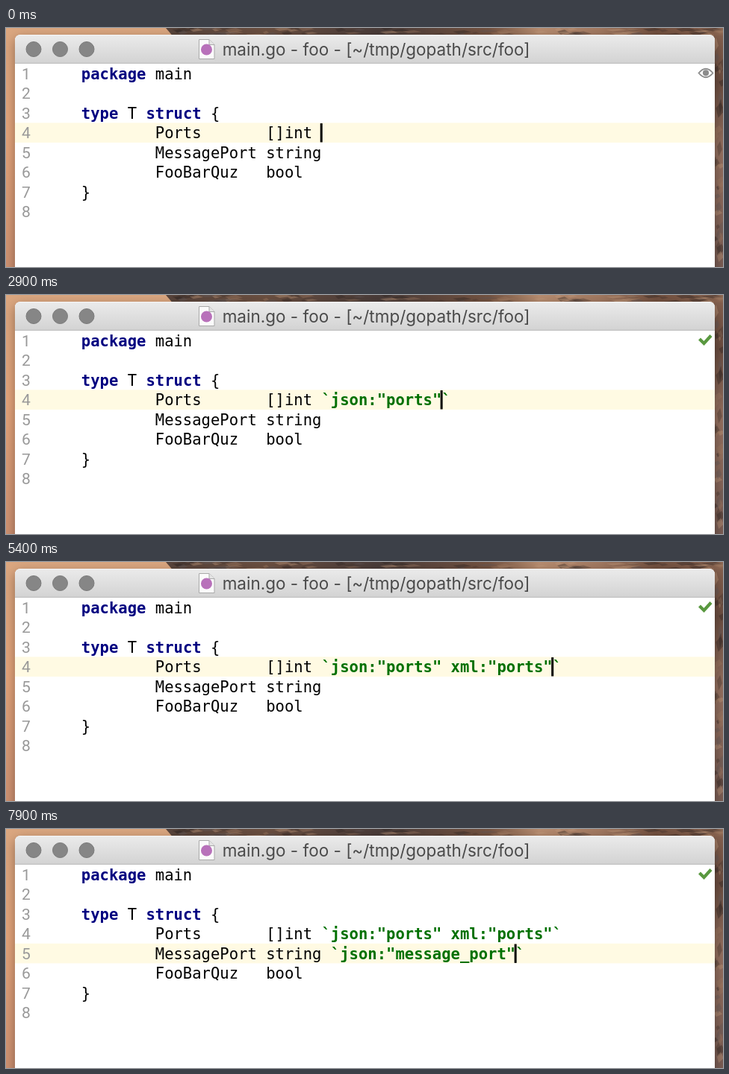
An HTML page for the animation above (8000 ms loop, 960 px wide and 321 px high).

```html
<!DOCTYPE html>
<html lang="en">
<head>
<meta charset="utf-8">
<title>Struct tag completion</title>
<style>
  html, body { margin: 0; width: 100%; height: 100%; overflow: hidden; background: #dba17b; }
  svg { display: block; width: 100vw; height: 100vh; }
  text { white-space: pre; }
  .code { font: 20.56px "DejaVu Sans Mono", monospace; fill: #000; }
  .keyword { font-weight: bold; fill: #000080; }
  .string { font-weight: bold; fill: #007000; }
  .number { font: 21px Roboto, sans-serif; fill: #999; }
  .match { fill: #d24fd0; }
  .rest { fill: #666; }
  .title { font: 22.5px Inter, sans-serif; fill: #4a4a4a; }
  .hint { font: 500 20.4px "Open Sans", sans-serif; fill: #111; }
  .symbol { font: 20px "DejaVu Sans", sans-serif; }
  .window { filter: drop-shadow(0 5px 8px rgba(0, 0, 0, .36)); }
  #popup { filter: drop-shadow(0 7px 8px rgba(0, 0, 0, .42)); }
</style>
</head>
<body>
<svg viewBox="0 0 960 321" preserveAspectRatio="none">
  <defs>
    <linearGradient id="sand" x2="0" y2="1">
      <stop offset="0" stop-color="#dba780"/>
      <stop offset=".45" stop-color="#e5a57b"/>
      <stop offset="1" stop-color="#cf9272"/>
    </linearGradient>
    <linearGradient id="ridge">
      <stop offset="0" stop-color="#58443b"/>
      <stop offset=".18" stop-color="#6c5041"/>
      <stop offset=".38" stop-color="#4a3c39"/>
      <stop offset=".58" stop-color="#745341"/>
      <stop offset=".67" stop-color="#b88d70"/>
      <stop offset=".78" stop-color="#a27961"/>
      <stop offset=".88" stop-color="#72503f"/>
      <stop offset="1" stop-color="#8a6551"/>
    </linearGradient>
    <linearGradient id="slope" x2="0" y2="1">
      <stop offset="0" stop-color="#84604e"/>
      <stop offset=".2" stop-color="#6b4d40"/>
      <stop offset=".5" stop-color="#94705f"/>
      <stop offset="1" stop-color="#7a5d54"/>
    </linearGradient>
    <linearGradient id="bar" x2="0" y2="1">
      <stop offset="0" stop-color="#ebebeb"/>
      <stop offset="1" stop-color="#d3d3d3"/>
    </linearGradient>
  </defs>

  <rect width="960" height="321" fill="url(#sand)"/>
  <path d="M214 0H960V14H226Z" fill="url(#ridge)"/>
  <rect x="944" y="10" width="16" height="311" fill="url(#slope)"/>
  <g id="rocks"></g>

  <path class="window" d="M12 340V17q0-8 8-8H941q8 0 8 8V340Z" fill="#fff"/>
  <path d="M12 47V17q0-8 8-8H941q8 0 8 8V47Z" fill="url(#bar)"/>
  <path d="M18 9.5H943" stroke="#f5f5f5"/>
  <path d="M12 47.3H949" stroke="#b4b4b4"/>
  <g fill="#868686" stroke="#7a7a7a">
    <circle cx="37" cy="28.5" r="10"/>
    <circle cx="72.5" cy="28.5" r="10"/>
    <circle cx="108" cy="28.5" r="10"/>
  </g>
  <path d="M258.5 15.5H272L279 22.5V41.5H258.5Z" fill="#fbfbfb" stroke="#a9a9a9"/>
  <path d="M272 15.5V22.5H279" fill="#e4e4e4" stroke="#a9a9a9"/>
  <circle cx="268.5" cy="29" r="7.5" fill="#b871ba"/>
  <text class="title" x="495.6" y="37" text-anchor="middle">main.go - foo - [~/tmp/gopath/src/foo]</text>

  <rect id="highlight" x="12" width="937" height="26.6" fill="#fffae3"/>
  <g id="lines"></g>
  <rect id="caret" width="3" height="25.4"/>

  <g id="eye" fill="none" stroke="#8c8c8c" stroke-width="1.8">
    <path d="M927.5 60.5Q937 49 946.5 60.5Q937 72 927.5 60.5Z"/>
    <circle cx="937" cy="60.3" r="3.2" fill="#8c8c8c"/>
  </g>
  <path id="pause" d="M932 55h3.4v12.5H932ZM938.7 55h3.4v12.5h-3.4Z" fill="#a0a0a0"/>
  <path id="check" d="M928.5 59L934.5 65L944 54.5" fill="none" stroke="#59983f" stroke-width="4.2"/>

  <g id="popup">
    <rect width="720" height="57" fill="#ededed"/>
    <rect width="720" height="29.5" fill="#9fb4c8"/>
    <text class="code" x="17.4" y="22.8"><tspan id="typed" class="match"></tspan><tspan id="untyped" class="rest"></tspan></text>
    <text id="chooseHint" class="hint" x="2.5" y="49.5">Press <tspan class="symbol">^</tspan>. to choose the selected (or first) suggestion and insert a dot afterwards</text>
    <g id="moveHint" class="hint">
      <text class="symbol" x="2" y="49.5">^↓</text>
      <text x="35.5" y="49.5">and</text>
      <text class="symbol" x="76" y="49.5">^↑</text>
      <text x="109.5" y="49.5">will move caret down and up in the editor</text>
    </g>
  </g>
</svg>
<script>
const DURATION = 8000, LEFT = 100.8, TOP = 48.5, CHAR = 12.378, LINE = 26.45;
const $ = id => document.getElementById(id);
const columnX = column => LEFT + column * CHAR;
const lineY = line => TOP + (line - 1) * LINE;
const span = (kind, text) => `<tspan class="${kind}">${text}</tspan>`;
const show = (id, on) => $(id).setAttribute('display', on ? 'inline' : 'none');
const place = (id, x, y) => { $(id).setAttribute('x', x); $(id).setAttribute('y', y); };

const indent = ' '.repeat(8);
const portsField = indent + 'Ports       []int ';
const messageField = indent + 'MessagePort string';
const jsonTag = 'json:"ports"';
const bothTags = jsonTag + ' xml:"ports"';

// Each step: time, line, plain typed text, tag contents, completion word and its typed length.
const steps = [
  { at: 0, line: 4 },
  ...typing([900, 1000, 1100, 1200], 4, 'json', n => ({ plain: 'json'.slice(0, n) })),
  { at: 1900, line: 4, tag: jsonTag },
  { at: 3300, line: 4, tag: jsonTag + ' ' },
  ...typing([3500, 3700, 3800], 4, 'xml', n => ({ tag: jsonTag + ' ' + 'xml'.slice(0, n) })),
  { at: 4400, line: 4, tag: bothTags },
  { at: 5800, line: 5 },
  { at: 6400, line: 5, plain: ' ' },
  ...typing([6700, 6900, 7000, 7200], 5, 'json', n => ({ plain: ' ' + 'json'.slice(0, n) })),
  { at: 7600, line: 5, plain: ' ', tag: 'json:"message_port"' },
];

function typing(times, line, word, content) {
  return times.map((at, i) => ({ at, line, word, typed: i + 1, ...content(i + 1) }));
}

const quoted = tag => tag ? span('string', '`' + tag + '`') : '';

function buildLines() {
  const contents = [
    span('keyword', 'package') + ' main', '',
    span('keyword', 'type') + ' T ' + span('keyword', 'struct') + ' {',
    '', '', indent + 'FooBarQuz   bool', '}', '',
  ];
  $('lines').innerHTML = contents.map((content, i) => {
    const y = lineY(i + 1) + 20.5;
    return `<text class="number" x="21" y="${y}">${i + 1}</text>` +
      `<text class="code" id="line${i + 1}" x="${LEFT}" y="${y}">${content}</text>`;
  }).join('');
}

function buildRocks() {
  let seed = 17;
  const random = () => (seed = seed * 16807 % 2147483647) / 2147483647;
  const colors = ['#2f2624', '#a07a62', '#49372f', '#c49b7e', '#655a5b'];
  const shard = (x, y, w, h) => {
    const color = colors[Math.floor(random() * colors.length)];
    return `<path d="M${x} ${y}l${w * .6} ${-h * .4}l${w * .4} ${h * .6}l${-w * .7} ${h * .5}Z" fill="${color}" opacity=".4"/>`;
  };
  let rocks = '';
  for (let i = 0; i < 75; i++) rocks += shard(222 + random() * 735, random() * 9, 8 + random() * 24, 2 + random() * 4);
  for (let i = 0; i < 32; i++) rocks += shard(946 + random() * 9, 10 + random() * 310, 4 + random() * 9, 5 + random() * 14);
  $('rocks').innerHTML = rocks;
}

let shownStep;
function applyStep(step) {
  const { line, plain = '', tag = '', word, typed } = step;
  const field = line === 4 ? portsField : messageField;
  const column = field.length + plain.length + (tag ? tag.length + 1 : 0);
  const content = field + plain + quoted(tag);
  $('line4').innerHTML = line === 4 ? content : portsField + quoted(bothTags);
  $('line5').innerHTML = line === 5 ? content : messageField;
  place('highlight', 12, lineY(line) - .5);
  place('caret', columnX(column) - 1.9, lineY(line) + .2);
  show('popup', word);
  show('pause', word);
  if (word) {
    $('popup').setAttribute('transform', `translate(${columnX(column - typed) - 17.4} ${lineY(line + 1) - .8})`);
    $('typed').textContent = word.slice(0, typed);
    $('untyped').textContent = word.slice(typed);
    show('chooseHint', word === 'json');
    show('moveHint', word === 'xml');
  }
}

function render(time) {
  const step = steps.findLast(s => s.at <= time);
  if (step !== shownStep) applyStep(shownStep = step);
  const age = time - step.at;
  show('caret', age % 1000 < 500);
  show('eye', !step.word && age < 300);
  show('check', !step.word && age >= 300);
}

buildLines();
buildRocks();
const start = performance.now();
function tick() {
  render((performance.now() - start) % DURATION);
  requestAnimationFrame(tick);
}
tick();
</script>
</body>
</html>
```
